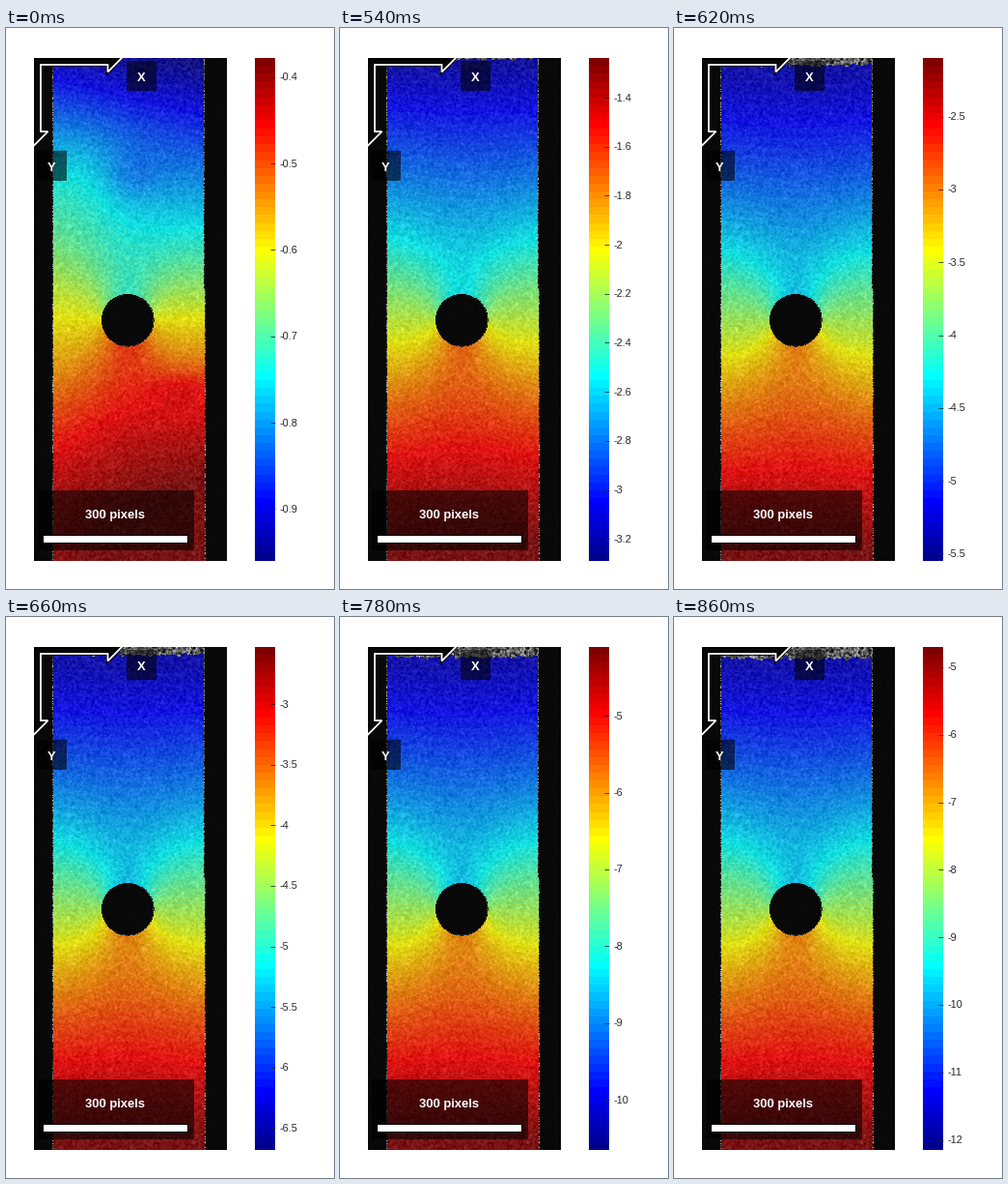
These frames come from a looping animation (340x580 px, 1400 ms). A matplotlib script:

```python
import math

import numpy as np
import matplotlib.pyplot as plt
from matplotlib.animation import FuncAnimation
from matplotlib.patches import Polygon, Rectangle

W, H, DPI = 340, 580, 100
PX = 72 / DPI
INTERVAL, FRAMES = 20, 70
HOLD, STEP, STATES = 500, 40, 11
LEFT, RIGHT, TOP, BOTTOM = 29, 229, 31, 551
HOLE_X, HOLE_Y, HOLE_R = 126, 302, 27
FONT, INK = "Liberation Sans", "#262626"

# Key points of the colour range: load state, lowest and highest displacement.
RANGE_KEYS = [(0, -0.96, -0.378), (1, -2.09, -0.768), (2, -3.29, -1.238),
              (5, -6.68, -2.528), (8, -10.65, -4.106), (10, -12.15, -4.70)]

rng = np.random.default_rng(7)
ys, xs = np.mgrid[TOP:BOTTOM, LEFT:RIGHT] + 0.5
dx, dy = xs - HOLE_X, ys - HOLE_Y
radius = np.hypot(dx, dy)


def jet(value):
    """Classic 64-step jet: three shifted trapezoids."""
    level = (np.floor(np.clip(value, 0, 0.999) * 64) + 1) / 64
    return np.clip(1.5 - np.abs(4 * level[..., None] - [3, 2, 1]), 0, 1)


def smooth(noise, passes=1):
    for _ in range(passes):
        for axis in range(noise.ndim):
            noise = (np.roll(noise, 1, axis) + 2 * noise + np.roll(noise, -1, axis)) / 4
    return noise / noise.std()


def gray(level):
    return np.repeat(level[..., None], 3, axis=-1)


def bump(x, y, sx, sy):
    return np.exp(-((xs - x) / sx) ** 2 - ((ys - y) / sy) ** 2)


def hole_effect():
    """Axial displacement around a round hole in a stretched plate."""
    a = HOLE_R / np.maximum(radius, HOLE_R)
    theta = np.arctan2(dx, dy)
    triple = np.cos(3 * theta)
    return 0.05 * (a * (3 * np.cos(theta) + triple) - a ** 3 * triple)


speckle = 0.85 * smooth(rng.normal(size=xs.shape)) + 0.45 * rng.normal(size=xs.shape)
speckle = np.clip(0.38 + 0.17 * speckle, 0, 1)
ragged = smooth(rng.normal(size=RIGHT - LEFT), 3)
glints = rng.random(xs.shape) ** 2

right_edge = 204.7 + (ys > 270)
specimen = (xs > 49) & (xs < right_edge) & (radius > HOLE_R)
side_rim = (abs(xs - 48.5) < 0.5) | ((xs >= right_edge) & (xs < right_edge + 1))
hole_rim = (abs(radius - HOLE_R) < 0.6) & (dx + 0.6 * dy > 0)

depth_ratio = dy / 260
stretch = (0.53 + 0.27 * depth_ratio + 0.196 * np.sin(1.41 * depth_ratio)
           + hole_effect())
slack = np.clip(1 - depth_ratio ** 4, 0, 1)
bending = (0.04 * (xs - 127) / 78 * np.tanh(dy / 60)
           + 0.05 * bump(75, 150, 55, 60) - 0.05 * bump(130, 155, 28, 25)
           + 0.06 * bump(185, 372, 35, 18))


def photo(state):
    looseness = math.exp(-(state / 2) ** 2)
    field = stretch + 0.09 * looseness * slack + looseness ** 3 * bending
    strip = min(4.6 + 0.75 * state, 5 * state - 8.7)
    bare = ys - TOP < strip + ragged

    image = gray(0.035 + 0.02 * (speckle - 0.4))
    surface = np.where(bare[..., None], gray(speckle),
                       0.8 * jet(field) + 0.2 * gray(speckle))
    image[specimen] = surface[specimen]
    image[side_rim] = gray(0.8 * glints[side_rim])
    image[hole_rim] = gray(0.45 * glints[hole_rim])
    return image


def tick_step(span):
    steps = (digit * 10.0 ** power for power in range(-2, 2) for digit in (1, 2, 5))
    return next(step for step in steps if span / step <= 10.5)


def ticks(state):
    states, lows, highs = zip(*RANGE_KEYS)
    low, high = np.interp(state, states, lows), np.interp(state, states, highs)
    step = tick_step(high - low)
    for k in range(math.ceil(low / step), math.floor(high / step) + 1):
        value = k * step
        yield TOP + (high - value) / (high - low) * (BOTTOM - TOP), f"{value:.4g}"


fig = plt.figure(figsize=(W / DPI, H / DPI), dpi=DPI, facecolor="white")
ax = fig.add_axes([0, 0, 1, 1])
ax.axis("off")


def show(image, x0, x1):
    return ax.imshow(image, extent=(x0, x1, BOTTOM, TOP),
                     interpolation="nearest", aspect="auto")


def box(x0, y0, x1, y1, **style):
    ax.add_patch(Rectangle((x0, y0), x1 - x0, y1 - y0, lw=0,
                           antialiased=False, zorder=3, **style))


def label(x, y, text):
    ax.text(x, y, text, color="white", family=FONT, weight="bold",
            size=13 * PX, ha="center", va="baseline", zorder=5)


photos = [photo(state) for state in range(STATES)]
picture = show(photos[0], LEFT, RIGHT)
show(jet((np.arange(64)[::-1, None] + 0.5) / 64), 258, 279)
ax.set(xlim=(0, W), ylim=(H, 0))

for corners in ((125, 34, 156, 65), (32, 127, 63, 158), (33, 478, 195, 540)):
    box(*corners, fc="black", alpha=0.58)
box(38, 524, 189, 533, fc="black")
box(39, 525, 188, 532, fc="white")
label(140.5, 55, "X")
label(47, 148, "Y")
label(113.5, 507, "300 pixels")

arrows = [(120, 31), (105.5, 45.5), (105.5, 38), (36, 38),
          (36, 107), (43.5, 107), (29, 121.5)]
frame_clip = Rectangle((LEFT, TOP), RIGHT - LEFT, BOTTOM - TOP, transform=ax.transData)
body = ax.add_patch(Polygon([(LEFT, TOP)] + arrows, fc="#080808", ec="black",
                            lw=3.5 * PX, joinstyle="miter", zorder=4))
outline, = ax.plot(*zip(*arrows), color="white", lw=1.8 * PX,
                   solid_joinstyle="miter", zorder=4.5)
for artist in (body, outline):
    artist.set_clip_path(frame_clip)

tick_labels = [ax.text(284, 0, "", color=INK, family=FONT, size=11 * PX,
                       va="baseline") for _ in range(12)]
tick_marks = [ax.plot([], [], color=INK, lw=0.8 * PX, solid_capstyle="butt",
                      zorder=3)[0] for _ in range(12)]


def update(frame):
    elapsed = frame * INTERVAL
    state = min(max((elapsed - HOLD) // STEP + 1, 0), STATES - 1)
    picture.set_data(photos[state])
    marks = list(ticks(state))
    for i, (text, mark) in enumerate(zip(tick_labels, tick_marks)):
        visible = i < len(marks)
        text.set_visible(visible)
        mark.set_visible(visible)
        if visible:
            y, value = marks[i]
            text.set_text(value)
            text.set_y(y + 3.5)
            mark.set_data([274, 279], [y, y])
    return [picture, *tick_labels, *tick_marks]


animation = FuncAnimation(fig, update, frames=FRAMES, interval=INTERVAL,
                          repeat=True, repeat_delay=0, blit=False)
plt.show()
```
